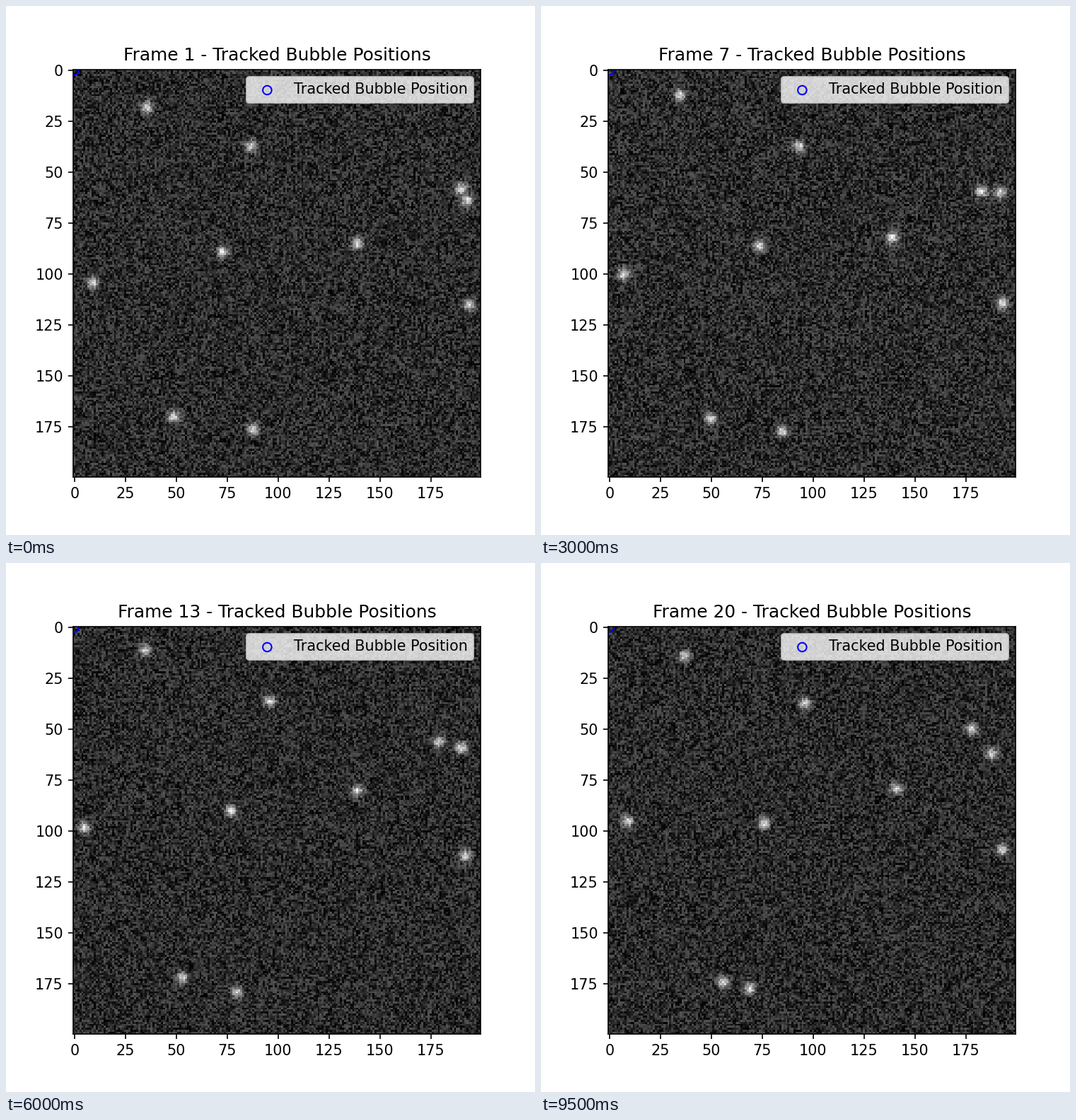
Write a matplotlib script that moves like this. It is 748x748 px and loops after 10 s.

```python
import numpy as np
import matplotlib.pyplot as plt
from matplotlib.animation import FuncAnimation

SIZE = 200
FRAMES = 20
INTERVAL = 500
SIGMA = 2.0
NOISE = 0.5
WANDER = 0.8

# Where each bubble starts, is halfway, and ends, as (x, y) cells.
BUBBLES = [
    [(36, 18), (34, 10), (37, 14)],
    [(87, 37), (96, 36), (96, 37)],
    [(190, 58), (180, 58), (178, 50)],
    [(193, 64), (191, 59), (188, 62)],
    [(139, 85), (139, 80), (141, 79)],
    [(73, 89), (77, 87), (76, 96)],
    [(9, 104), (5, 98), (9, 95)],
    [(194, 115), (192, 112), (193, 109)],
    [(49, 170), (52, 172), (56, 174)],
    [(88, 176), (83, 179), (69, 177)],
]


def walk(stops, rng):
    """Integer random drift that passes through the given stops."""
    t = np.linspace(0, 2, FRAMES)
    path = np.column_stack([np.interp(t, [0, 1, 2], axis) for axis in zip(*stops)])
    loose = np.abs(np.sin(np.pi * t))[:, None]
    path += WANDER * loose * rng.standard_normal(path.shape)
    return np.rint(path)


walk_rng = np.random.default_rng(7)
paths = [walk(stops, walk_rng) for stops in BUBBLES]
rows, cols = np.mgrid[:SIZE, :SIZE]


def bubble_image(n):
    image = NOISE * np.random.default_rng(n).random((SIZE, SIZE))
    for path in paths:
        x, y = path[n]
        image += np.exp(-((cols - x) ** 2 + (rows - y) ** 2) / (2 * SIGMA**2))
    return image


fig, ax = plt.subplots(figsize=(5, 5), dpi=149.6)
picture = ax.imshow(bubble_image(0), cmap="gray", interpolation="nearest")
ax.scatter([0], [0], s=36, facecolors="none", edgecolors="blue", linewidths=1,
           label="Tracked Bubble Position")
ax.set_xlim(-0.5, SIZE - 0.5)
ax.set_ylim(SIZE - 0.5, -0.5)
ticks = range(0, SIZE, 25)
ax.set_xticks(ticks)
ax.set_yticks(ticks)
ax.legend(loc="upper right")
title = ax.set_title("")


def update(n):
    image = bubble_image(n)
    picture.set_data(image)
    picture.set_clim(image.min(), image.max())
    title.set_text(f"Frame {n + 1} - Tracked Bubble Positions")
    return picture, title


anim = FuncAnimation(fig, update, frames=FRAMES, interval=INTERVAL, repeat=True)
plt.show()
```
